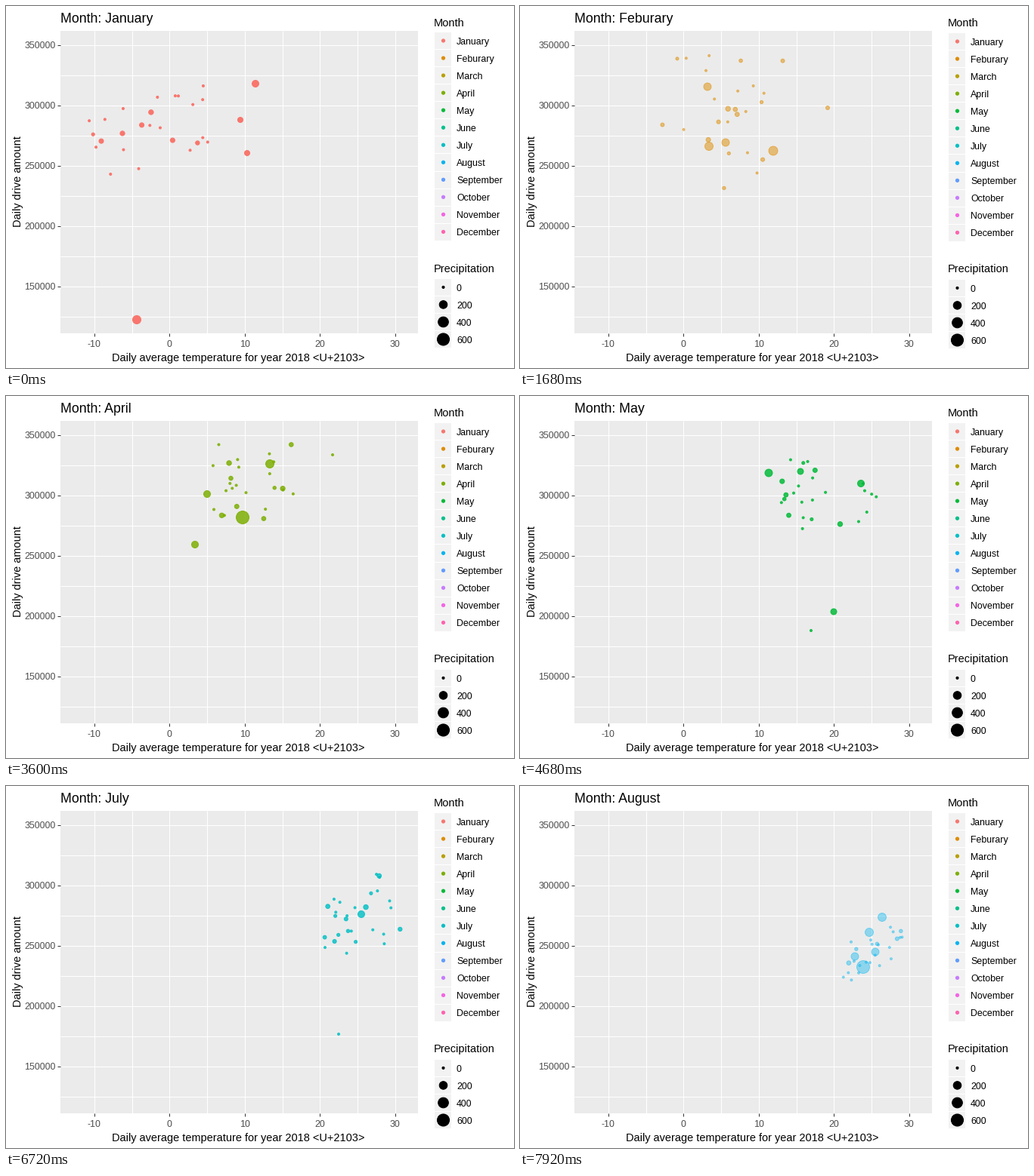
Animation of 672x480 px, one loop 8000 ms. Source, as a matplotlib script:

```python
import numpy as np
import matplotlib.pyplot as plt
from matplotlib.animation import FuncAnimation
from matplotlib.collections import PatchCollection
from matplotlib.patches import Circle, Rectangle

plt.rcParams["font.family"] = "Liberation Sans"

W, H, DPI = 672, 480, 96
PX = 72 / DPI                       # points per pixel
LEFT, RIGHT, TOP, BOTTOM = 72, 545, 33, 434
TICK_MS, INTERVAL, LOOP_MS = 120, 40, 8000
HOLD = 3
SPANS = [6] * 5 + [5] * 3           # ticks taken by each month change
DAYS = 30
KEY = 23.04                         # height of a legend key
GREY = "#4D4D4D"

NAMES = ["January", "Feburary", "March", "April", "May", "June", "July",
         "August", "September", "October", "November", "December"]
COLORS = ["#F8766D", "#DE8C00", "#B79F00", "#7CAE00", "#00BA38", "#00C08B",
          "#00BFC4", "#00B4F0", "#619CFF", "#C77CFF", "#F564E3", "#FF64B0"]

fig = plt.figure(figsize=(W / DPI, H / DPI), dpi=DPI, facecolor="white")
ax = fig.add_axes([0, 0, 1, 1])
ax.axis("off")
ax.axis([0, W, H, 0])


def label(x, y, text, size, color="black", **kw):
    return ax.text(x, y, text, fontsize=size * PX, color=color,
                   va="baseline", **kw)


def rect(x0, y0, x1, y1, **kw):
    return ax.add_patch(Rectangle((x0, y0), x1 - x0, y1 - y0, **kw))


def dots(points, color):
    """Filled circles with a one pixel outline, as (x, y, radius)."""
    circles = [Circle((x, y), r - 0.5) for x, y, r in points]
    return ax.add_collection(PatchCollection(
        circles, facecolor=color, edgecolor=color, lw=PX, zorder=3))


def month(index, x_range, y_range, lean, *marked):
    """Marked days plus a seeded cloud; lean makes warm days rank higher."""
    rng = np.random.default_rng(index)
    n = DAYS - len(marked)
    u, v = rng.beta(1.6, 1.6, (2, n))
    v += lean * (1 - u - v)
    x = x_range[0] + u * np.ptp(x_range)
    y = y_range[0] + v * np.ptp(y_range)
    r = np.where(rng.random(n) < 0.3, rng.uniform(2.5, 3.8, n), 2)
    return dots([*zip(x, y, r), *marked], COLORS[index])


def panel():
    rect(LEFT, TOP, RIGHT, BOTTOM, fc="#EBEBEB", lw=0)
    xs = 116.8 + 49.75 * np.arange(9)
    ys = 52 + 40 * np.arange(10)
    ax.vlines(xs, TOP, BOTTOM, color="white", lw=PX)
    ax.hlines(ys, LEFT, RIGHT, color="white", lw=PX)
    ax.vlines(xs[::2], BOTTOM, BOTTOM + 4, color="#333333", lw=PX)
    ax.hlines(ys[::2], LEFT - 4, LEFT, color="#333333", lw=PX)
    for i, (x, y) in enumerate(zip(xs[::2], ys[::2])):
        label(x, 452, str(10 * i - 10), 12.4, GREY, ha="center")
        label(65.5, y + 4.4, str(350000 - 50000 * i), 12.4, GREY, ha="right")
    label(307.5, 471, "Daily average temperature for year 2018 <U+2103>",
          14.55, ha="center")
    label(20, 232.5, "Daily drive amount", 14.55, ha="center", rotation=90,
          rotation_mode="anchor")
    label(566, 27, "Month", 14.55)
    label(566, 353, "Precipitation", 14.55)


def legend(shift):
    """Rows of both legends; returns their artists."""
    out = []

    def row(y, text, r, color):
        y += shift
        out.append(rect(566, y - KEY / 2, 589, y + KEY / 2, fc="#F2F2F2",
                        ec="white", lw=PX))
        out.append(dots([(578, y - 0.2, r)], color))
        out.append(label(596, y + 5, text, 12.4))

    for i, (name, color) in enumerate(zip(NAMES, COLORS)):
        row(45.7 + KEY * i, name, 2.6, color)
    for i in range(4):
        size = 1 + 5 * np.sqrt(200 * i / 640)
        row(372.6 + KEY * i, str(200 * i), 0.7 + 1.34 * size, "black")
    return out


panel()
title = label(72, 22, "", 17.8)
legends = [legend(0), legend(1)]
clouds = [
    month(0, (93, 300), (74, 238), 0.2,
          (173, 416, 6), (330, 103, 5), (310, 151, 4), (319, 195, 4)),
    month(1, (168, 356), (52, 242), 0,
          (335, 192, 6.5), (250, 186, 6), (272, 181, 5.5), (248, 107, 5.5),
          (407, 135, 3)),
    month(2, (215, 390), (55, 195), 0.2, (291, 321, 2), (300, 150, 5)),
    month(3, (250, 390), (52, 175), 0,
          (313, 161, 9), (349, 90, 6), (266, 130, 5), (250, 197, 5),
          (432, 78, 2)),
    month(4, (330, 490), (73, 185), 0,
          (329, 102, 5.5), (451, 116, 5), (371, 100, 4.5), (415, 286, 4.5),
          (385, 311, 2)),
    month(5, (376, 497), (97, 222), 0,
          (462, 126, 7), (448, 116, 5), (443, 98, 4), (363, 187, 4)),
    month(6, (415, 522), (100, 230), 0, (440, 329, 2), (470, 170, 5)),
    month(7, (421, 518), (147, 284), 0.5,
          (454, 240, 9), (479, 174, 6), (462, 194, 6), (470, 220, 5.5),
          (443, 226, 5.5)),
]


def state(tick):
    """Month in the title, month of the points and their opacity."""
    start = HOLD
    for shown, span in enumerate(SPANS):
        k = tick - start + 1
        if k <= 0:
            return shown, shown, 1
        if k < span:
            return shown + (k > 3), shown, 1 - k / span
        start += span + HOLD
    return shown, shown, 1


def update(i):
    tick = i * INTERVAL // TICK_MS
    named, shown, alpha = state(tick)
    title.set_text("Month: " + NAMES[named])
    for m, cloud in enumerate(clouds):
        cloud.set_visible(m == shown)
    clouds[shown].set_alpha(alpha)
    for n, group in enumerate(legends):
        for artist in group:
            artist.set_visible(n == (tick > 0))
    return []


anim = FuncAnimation(fig, update, frames=LOOP_MS // INTERVAL,
                     interval=INTERVAL, repeat=True, repeat_delay=0)
plt.show()
```
